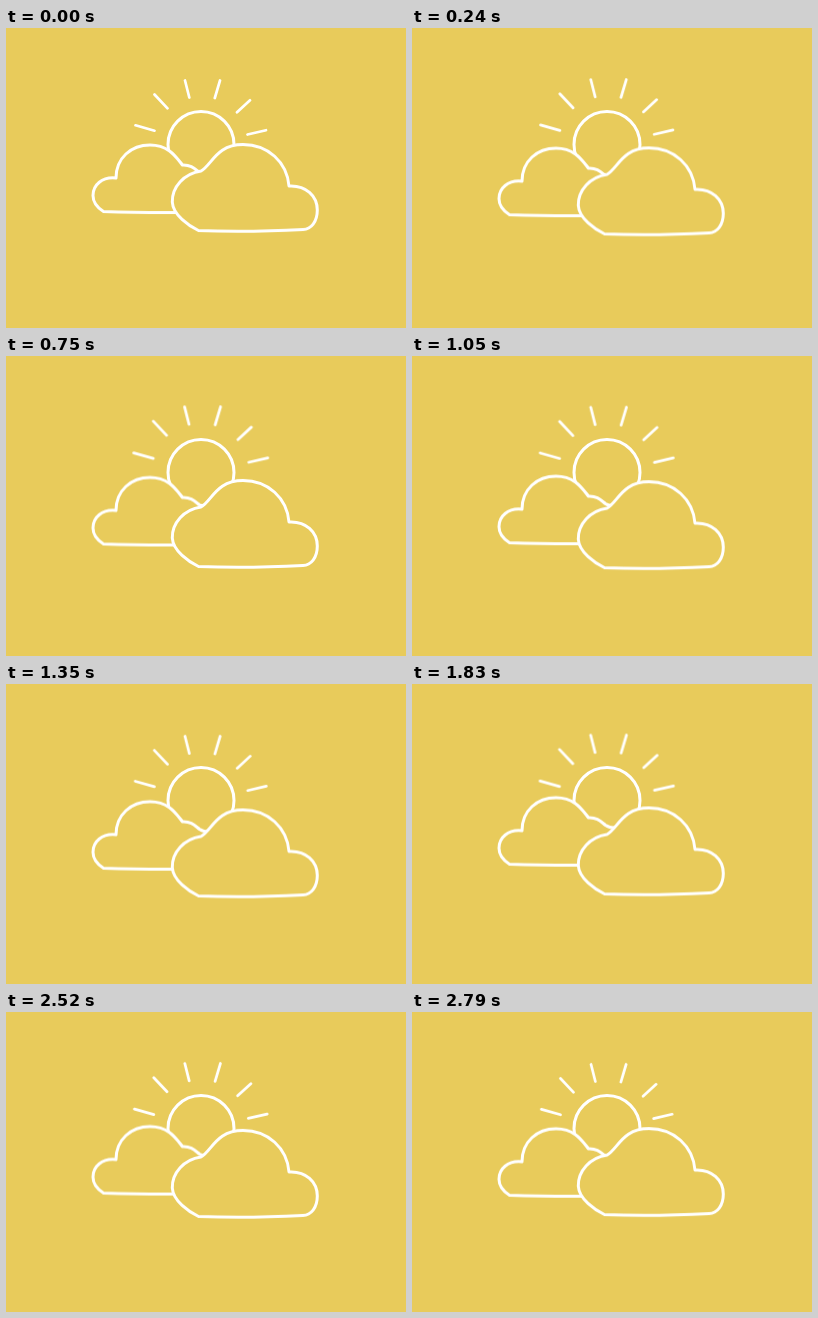
Recreate the animation shown at these times as an HTML page. Size 400x300 px, loop 2.82 s.

```html
<!DOCTYPE html>
<html lang="en">
<head>
<meta charset="utf-8">
<title>Sun and clouds</title>
<style>
  :root { --sky: #e8cb5b; }
  html, body {
    margin: 0;
    width: 100%;
    height: 100%;
    overflow: hidden;
    background: var(--sky);
  }
  svg { display: block; width: 400px; height: 300px; }
  .sun, .cloud, .rays {
    fill: var(--sky);
    stroke: #fff;
    stroke-width: 3;
    stroke-linecap: round;
    stroke-linejoin: round;
  }
  .rays {
    stroke-width: 2.7;
    transform-origin: 195px 116px;
    animation: shine 1410ms infinite;
  }
  .back { animation: drift-back 2820ms infinite; }
  .front { animation: drift-front 2820ms infinite; }

  @keyframes shine {
    0% { transform: scale(1); animation-timing-function: cubic-bezier(.36, .56, .64, 1); }
    50% { transform: scale(1.027); animation-timing-function: cubic-bezier(.36, 0, .64, .44); }
    100% { transform: scale(1); }
  }
  @keyframes drift-back {
    0% { transform: translateY(0); animation-timing-function: cubic-bezier(.2, .7, .5, 1); }
    24.5% { transform: translateY(4.5px); animation-timing-function: cubic-bezier(.37, 0, .63, 1); }
    74.5% { transform: translateY(-4.1px); animation-timing-function: cubic-bezier(.36, 0, .64, .44); }
    100% { transform: translateY(0); }
  }
  @keyframes drift-front {
    0% { transform: translateY(0); animation-timing-function: cubic-bezier(.31, .68, .66, 1); }
    45.7% { transform: translateY(9.5px); animation-timing-function: cubic-bezier(.4, .05, .75, .85); }
    100% { transform: translateY(0); }
  }
</style>
</head>
<body>
<svg viewBox="0 0 400 300">
  <path class="rays" d="M129.5 97.3 148.5 102.7M148.5 66.5 161.5 80.3M179 52.5 183.3 69.5
    M214 52.5 208.8 70M244 72.3 231 84.3M260 102.2 241.5 106.5"/>
  <circle class="sun" cx="195" cy="116.5" r="33"/>
  <path class="cloud back" d="M206 184.5H172Q132 184.7 97.5 183.5C92 180 87 175 87 167.5
    C87 157 96 148.500 110 150C110 130 125 117 144 117C163 117 170 129 176.500 137
    C185 136.500 189 141 193.500 144.500C197 147 201 147.500 206 147"/>
  <path class="cloud front" d="M192.500 202.500C183 198 167 187 166.300 174C166 159 178 145.500 195 143
    C206 137 210 116.500 237 116.500C262 116.500 281 134 283 158
    C300 157 311.300 168 311.300 182C311.300 194 305 201 297 201.500Q240 204.500 192.500 202.500Z"/>
</svg>
</body>
</html>
```
